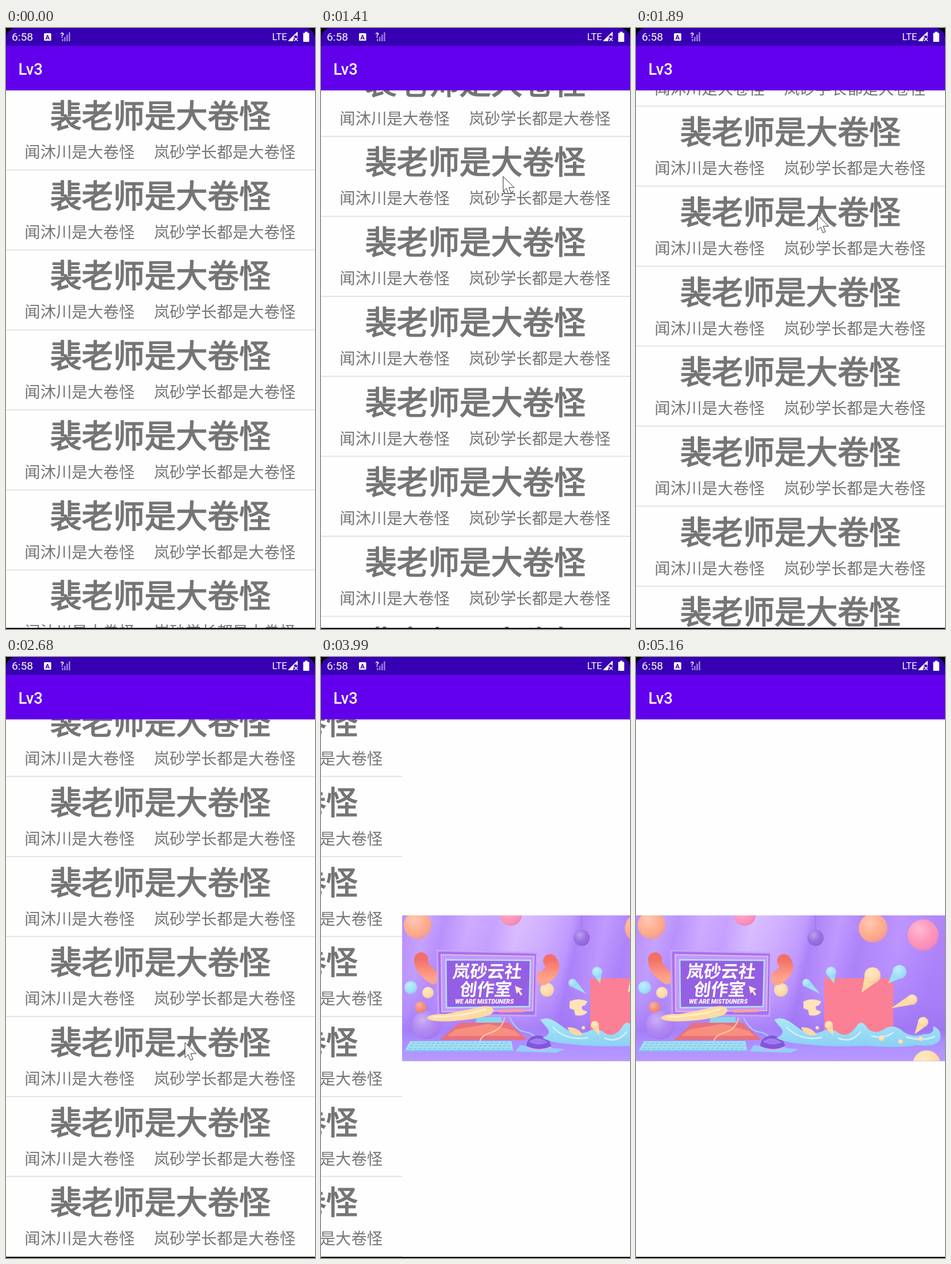
Animation, 537 px wide and 1042 px high, one loop 5860 ms. Source, as an HTML page:

```html
<!DOCTYPE html>
<html lang="zh-CN">
<head>
<meta charset="utf-8">
<title>Lv3</title>
<style>
html, body { margin: 0; width: 100%; height: 100%; overflow: hidden; background: #000; }
svg { display: block; }
.cjk { font-family: "Noto Sans CJK SC", "Noto Sans CJK", sans-serif; }
.bar { font-family: Roboto, sans-serif; fill: #fff; }
#list { fill: #757575; font-size: 27.35px; }
#list .head { font-size: 54.7px; stroke: #757575; stroke-width: 1.7px; }
.sign { fill: #fff; font-size: 30px; font-weight: 900; }
</style>
</head>
<body>
<svg id="stage" width="537" height="1042" viewBox="0 0 537 1042">
  <defs>
    <linearGradient id="curtain" gradientTransform="rotate(6)">
      <stop offset="0" stop-color="#b489fb"/><stop offset=".08" stop-color="#c9a6ff"/>
      <stop offset=".14" stop-color="#b78dfc"/><stop offset=".22" stop-color="#d0aeff"/>
      <stop offset=".3" stop-color="#c7a2ff"/><stop offset=".38" stop-color="#dfc6ff"/>
      <stop offset=".47" stop-color="#d3b4ff"/><stop offset=".55" stop-color="#c09aff"/>
      <stop offset=".58" stop-color="#a97cf6"/><stop offset=".66" stop-color="#bf98ff"/>
      <stop offset=".74" stop-color="#a97df7"/><stop offset=".86" stop-color="#bb92ff"/>
      <stop offset="1" stop-color="#a87cf6"/>
    </linearGradient>
    <linearGradient id="haze" x2="0" y2="1">
      <stop offset="0" stop-color="#c9a4ff" stop-opacity=".2"/>
      <stop offset=".5" stop-color="#ac84fb" stop-opacity=".35"/>
      <stop offset=".78" stop-color="#9b72f4" stop-opacity=".75"/>
      <stop offset=".86" stop-color="#ab8dff"/><stop offset="1" stop-color="#b69aff"/>
    </linearGradient>
    <linearGradient id="shade" x2="0" y2="1">
      <stop offset="0" stop-color="#000" stop-opacity=".17"/><stop offset="1" stop-color="#000" stop-opacity="0"/>
    </linearGradient>
    <linearGradient id="wave" x2="0" y2="1">
      <stop offset="0" stop-color="#a9e8f8"/><stop offset="1" stop-color="#8bcff3"/>
    </linearGradient>
    <linearGradient id="hook" x2="0" y2="1">
      <stop offset="0" stop-color="#f27068"/><stop offset="1" stop-color="#ffa48c"/>
    </linearGradient>
    <radialGradient id="shine" cx=".38" cy=".32" r=".7">
      <stop offset="0" stop-color="#fff" stop-opacity=".4"/>
      <stop offset=".6" stop-color="#fff" stop-opacity=".08"/>
      <stop offset="1" stop-color="#9050d0" stop-opacity=".15"/>
    </radialGradient>
  </defs>

  <rect width="537" height="1040" fill="#fefefe"/>
  <svg y="108" width="537" height="932" viewBox="0 108 537 932">
    <g id="pages">
      <svg y="108" width="537" height="932" viewBox="0 108 537 932"><g id="list" class="cjk"></g></svg>
      <svg x="537" y="448" width="537" height="252.5" viewBox="0 448 537 252.5">
        <rect y="448" width="537" height="253" fill="url(#curtain)"/>
        <rect y="448" width="537" height="253" fill="url(#haze)"/>
        <path d="M312 448V474" stroke="#9a70e4"/>
        <g id="balls"></g>

        <!-- monitor -->
        <g fill="none" stroke="url(#hook)" stroke-width="24" stroke-linecap="round">
          <path d="M33 524Q32 540 54 555M257 527Q269 542 245 557"/>
        </g>
        <path d="M130 624H172L176 642H126Z" fill="#8dd4ef"/>
        <path d="M100 634H185L218 664H65Z" fill="#e8707f"/>
        <path d="M92 646 150 636 196 648 206 657H78Z" fill="#f78f7f"/>
        <path d="M61 509 234 513 232 622 63 620Z" fill="#a273ee" stroke="#c9a2ff" stroke-width="3" stroke-linejoin="round"/>
        <path d="M68 516 229 519 227 613 69 615Z" fill="#c19afb" stroke="#ecb4e6" stroke-width="2"/>
        <path d="M76 525 223 526 221 606 77 608Z" fill="#955fe3" stroke="#b5def9" stroke-width="2.500" stroke-linejoin="round"/>
        <path d="M170 614 211 613" stroke="#ff9f9c" stroke-width="5" stroke-linecap="round"/>
        <g class="cjk sign" transform="translate(148 0) skewX(-7)" text-anchor="middle">
          <text x="67" y="556">岚砂云社</text><text x="68" y="587">创作室</text>
        </g>
        <text x="92" y="600.5" class="bar" font-size="10.4" font-weight="900" font-style="italic">WE ARE MISTDUNERS</text>
        <path d="M196 570 210 576 204 578 209 585 206 587 202 580 199 584Z" fill="#fff0cc"/>
        <path d="M43 626Q47 618 75 619 110 613 138 606C163 602 164 618 148 622 112 632 50 636 43 626Z" fill="#ffdba4"/>
        <path d="M55 624Q100 624 145 611" fill="none" stroke="#fff0c8" stroke-width="3" stroke-linecap="round"/>

        <!-- desk -->
        <g fill="none" stroke-width="2">
          <path d="M178 625Q175 645 152 652 136 657 135 668" stroke="#ffc796"/>
          <path d="M187 625Q198 648 214 650 230 653 234 664" stroke="#a3cffc"/>
        </g>
        <path d="M14 666H190L193 683 4 684Z" fill="#a3e2f4"/>
        <path d="M4 682.500H193" stroke="#86c3ee" stroke-width="3"/>
        <path d="M17 669.500H188M14 674H189M11 678.500H190" stroke="#7cc0e2" stroke-width="1.500" stroke-dasharray="6 2.500"/>
        <path d="M205 673 283 680 268 686 197 684Z" fill="#93cff7"/>
        <path d="M216 675C216 650 256 650 259 675Q240 687 216 675Z" fill="#8058d8"/>
        <path d="M220 667Q236 655 253 668 238 676 220 667Z" fill="#a27af3"/>
        <path d="M216 676Q238 686 259 676" fill="none" stroke="#d3b3ff" stroke-width="2.500"/>

        <!-- splash -->
        <rect x="327" y="557" width="120" height="110" fill="#fb7f95"/>
        <path d="M291 597Q306 590 322 597L318 604Q309 605 314 612L322 615Q316 624 301 621L299 612 291 609Z" fill="#ffe3b8"/>
        <path d="M240 629C253 622 265 630 282 643Q300 657 322 650 338 640 352 652 367 662 382 642 391 626 401 642 413 656 430 646 448 634 465 650 482 661 500 654 520 655 516 640 533 646 528 664 520 677 490 673 450 679 400 674 340 677 290 671 255 668 244 660 262 654 250 641Z" fill="url(#wave)"/>
        <path d="M262 642Q285 666 322 660M352 661Q375 670 390 650M410 657Q430 663 447 651M470 659Q500 667 519 658" fill="none" stroke="#d0f3ff" stroke-width="2.500" stroke-linecap="round"/>
        <path d="M287 642Q305 641 314 655 295 660 287 642Z" fill="#ffd89f"/>
        <g id="drops"></g>
      </svg>
    </g>
  </svg>
  <rect y="108" width="537" height="3" fill="url(#shade)"/>

  <!-- bars -->
  <rect width="537" height="32" fill="#3700b3"/>
  <rect y="31" width="537" height="77" fill="#6200ee"/>
  <path d="M0 0H18A18 18 0 0 0 0 18ZM537 0H519A18 18 0 0 1 537 18Z"/>
  <g class="bar">
    <text x="10" y="22.300" font-size="19.200">6:58</text>
    <text x="21.500" y="80.500" font-size="27.350" font-weight="500">Lv3</text>
    <text x="462.500" y="21" font-size="16.500">LTE</text>
    <rect x="66" y="9" width="12.500" height="13" rx="1.500"/>
    <text x="72.200" y="19.600" font-size="11.500" font-weight="700" text-anchor="middle" style="fill:#3700b3">A</text>
    <text x="94.500" y="16.500" font-size="12.500" font-weight="700">?</text>
    <path d="M97 19h2.500v4h-2.500zM101 15.500h2.500v7.500h-2.500zM105 11.500h2.500v11.500h-2.500zM109 7.500h2.500v15.500h-2.500z" opacity=".5"/>
    <path d="M490 22.500 506.500 7V13H501L499 22.500Z"/>
    <path d="M491.500 22 506 8V15M491 22H499M501 16.500 507 22.500M507 16.500 501 22.500" fill="none" stroke="#fff" stroke-width="1.500"/>
    <path d="M519.500 6.500H524V8.500H526Q527 8.500 527 9.500V23Q527 24 526 24H517.500Q516.500 24 516.500 23V9.500Q516.500 8.500 517.500 8.500H519.500Z"/>
  </g>

  <g id="pointer">
    <circle id="press" r="22.300" fill="#ff0" fill-opacity=".5"/>
    <path d="M.5.5V26.500L6.200 21.200 10 31 14.500 29.300 10.500 19.700H20Z" fill="#fff" stroke="#333"/>
  </g>
  <rect y="1040" width="537" height="2"/>
</svg>
<script>
const $ = id => document.getElementById(id);
const LOOP = 5860, ROW = 138.7;

const ball = (x, y, r, color) =>
  `<circle cx="${x}" cy="${y}" r="${r}" fill="${color}"/><circle cx="${x}" cy="${y}" r="${r}" fill="url(#shine)"/>`;

// a ball with a tail ending at (tx, ty)
function drop(x, y, r, tx, ty, color) {
  const d = Math.hypot(tx - x, ty - y), nx = (y - ty) / d * r, ny = (tx - x) / d * r;
  const mx = (x + tx) / 2, my = (y + ty) / 2;
  return `<path d="M${x + nx} ${y + ny}Q${mx + nx / 2} ${my + ny / 2} ${tx} ${ty}` +
    `Q${mx - nx / 2} ${my - ny / 2} ${x - nx} ${y - ny}Z" fill="${color}"/>` + ball(x, y, r, color);
}

const ORANGE = '#ffa685', PINK = '#ff8db6', CREAM = '#ffdaa2', CYAN = '#9ce1f7', PURPLE = '#8f63e0';
$('balls').innerHTML = [
  [27, 465, 24, ORANGE], [189, 447, 19, PINK], [312, 487, 14, PURPLE], [412, 470, 25, ORANGE],
  [499, 482, 27, PINK], [505, 706, 24, CREAM], [42, 638, 25, '#a97cf2'], [15, 573, 11, CYAN],
  [45, 582, 10, CREAM], [32, 607, 10, '#f5836f'], [252, 577, 12, CREAM]
].map(b => ball(...b)).join('');
$('drops').innerHTML = [
  [339, 546, 9, 344, 566, CYAN], [458, 546, 12, 438, 566, CYAN], [411, 552, 14, 392, 582, CREAM],
  [480, 594, 9, 443, 609, CREAM], [296, 565, 7, 320, 584, CYAN], [499, 633, 9, 484, 654, CREAM],
  [335, 638, 7, 343, 657, CREAM]
].map(d => drop(...d)).join('') +
  [[427, 661, 5], [460, 667, 4], [495, 662, 4], [315, 643, 3]].map(b => ball(...b, CREAM)).join('');

for (let i = 0; i < 8; i++)
  $('list').innerHTML += `<g transform="translate(0 ${i * ROW})">
    <text class="head" x="76.800" y="172">裴老师是大卷怪</text>
    <text x="32.300" y="225">闻沐川是大卷怪</text><text x="257" y="225">岚砂学长都是大卷怪</text>
    <path d="M0 138H537" transform="translate(0 108)" stroke="#dcdcdc" stroke-width="1.500"/></g>`;

const ticks = [
  [0, 0, 1], [230, 690, 7], [940, 940, 1], [1090, 1160, 2], [1260, 1570, 5], [1650, 1650, 1],
  [1720, 2280, 8], [2360, 2430, 2], [2680, 2990, 5], [3140, 3140, 1], [3370, 3670, 5],
  [3770, 3920, 3], [3990, 4240, 4], [4470, 5020, 8], [5100, 5160, 2]
].flatMap(([a, b, n]) => Array.from({ length: n }, (_, i) => n > 1 ? a + (b - a) * i / (n - 1) : a));

const pointerPath = [
  [230, 412, 999], [460, 322, 818], [690, 278, 728], [1020, 278, 728], [1090, 294, 500], [1160, 316, 257],
  [1780, 316, 257], [2280, 310, 592], [2430, 310, 670], [2680, 310.500, 668], [2990, 325.500, 631],
  [3320, 325.500, 631], [3670, 113, 629], [3990, -107, 629], [4469, -107, 680], [4470, 57, 695],
  [5020, 365, 997], [5100, 367, 1004]
];
const pagePath = [[3320, 0], [3670, -176], [3990, -396], [4073, -476], [4157, -521], [4240, -537]];

function along(path, t) {
  const i = path.findIndex(k => k[0] > t);
  if (i < 0) return path[path.length - 1].slice(1);
  if (i === 0) return path[0].slice(1);
  const a = path[i - 1], b = path[i], u = (t - a[0]) / (b[0] - a[0]);
  return a.slice(1).map((v, j) => v + (b[j + 1] - v) * u);
}

// finger drag, then a decelerating fling
function scrolled(t, y) {
  if (t < 1090) return 0;
  if (t < 1160) return 717 - y;
  const u = Math.min(1, (t - 1160) / 1120);
  return 499 + 1343 * (1 - (1 - u) ** 2.91);
}

function draw(now) {
  const time = now % LOOP, t = ticks.filter(k => k <= time).pop();
  const [x, y] = along(pointerPath, t), [page] = along(pagePath, t);
  const pressed = t >= 940 && t < 1160 || t >= 3140 && t < 3990;
  $('list').setAttribute('transform', `translate(0 ${-(scrolled(t, y) % ROW)})`);
  $('pages').setAttribute('transform', `translate(${page} 0)`);
  $('pointer').setAttribute('transform', `translate(${x} ${y})`);
  $('pointer').style.display = t >= 230 && t < 5160 ? '' : 'none';
  $('press').style.display = pressed ? '' : 'none';
}

let start;
function loop(now) {
  start ??= now;
  draw(now - start);
  requestAnimationFrame(loop);
}
draw(0);
requestAnimationFrame(loop);
</script>
</body>
</html>
```
